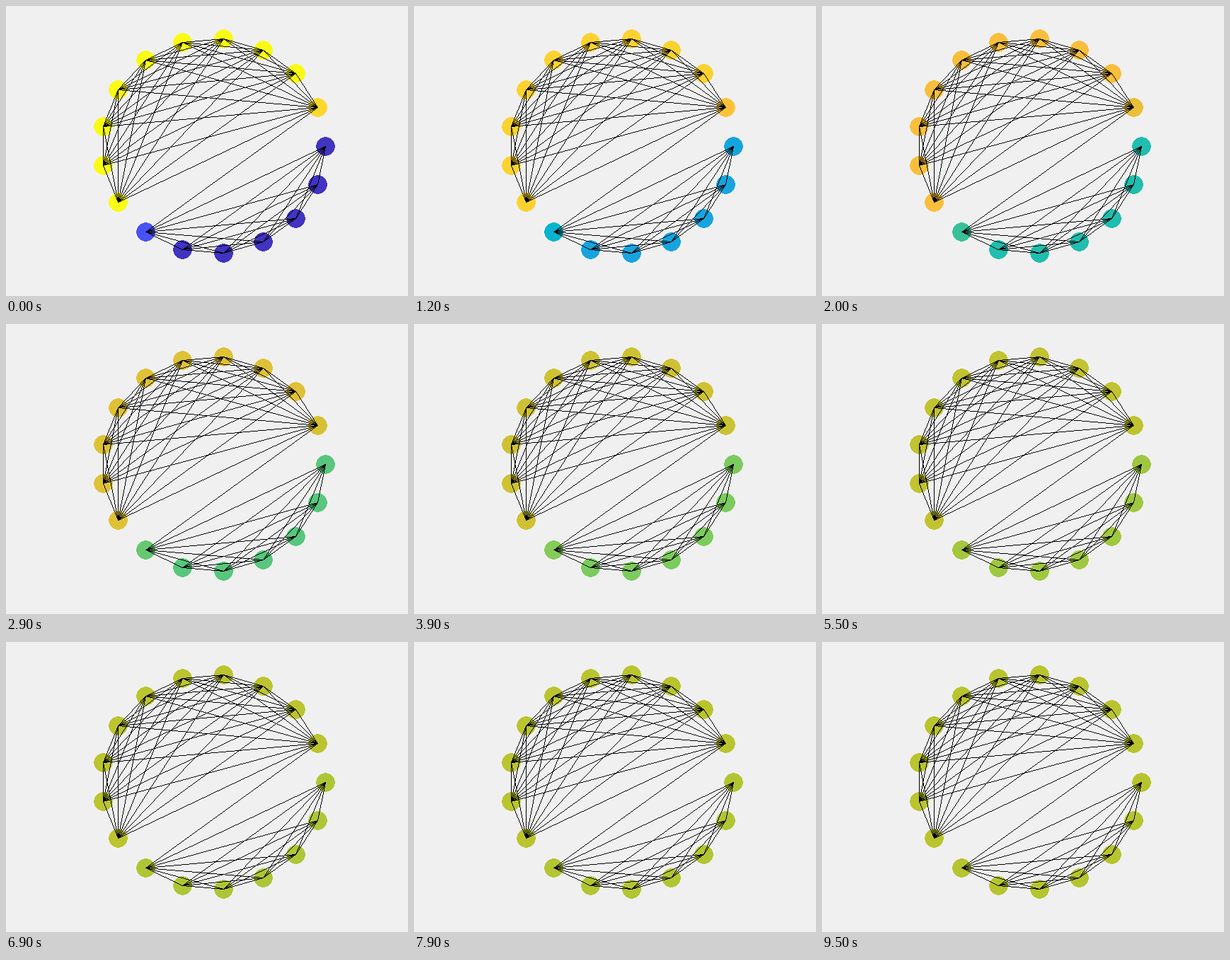
Recreate the animation shown at these times as a matplotlib script. Size 568 by 410 pixels, loop 10 s.

```python
from itertools import combinations

import numpy as np
import matplotlib.pyplot as plt
from matplotlib.animation import FuncAnimation
from matplotlib.collections import PatchCollection
from matplotlib.colors import LinearSegmentedColormap
from matplotlib.patches import Circle

W, H, DPI = 568, 410, 72
FRAMES, INTERVAL = 100, 100
STEPS = 2                         # averaging steps per frame

# Two complete groups of nodes joined by one edge
N, LOWER = 17, 7
LOW_BRIDGE, UP_BRIDGE = LOWER - 1, N - 1
edges = [*combinations(range(LOWER), 2), *combinations(range(LOWER, N), 2),
         (LOW_BRIDGE, UP_BRIDGE)]

# Each step replaces a node's level by the mean of its neighbours
mix = np.zeros((N, N))
for a, b in edges:
    mix[a, b] = mix[b, a] = 1
mix /= mix.sum(axis=1, keepdims=True)

start = np.where(np.arange(N) < LOWER, 4.0, 68.0)
start[LOW_BRIDGE], start[UP_BRIDGE] = 10, 58


def levels(i):
    return np.linalg.matrix_power(mix, STEPS * i) @ start


LOW, HIGH = 1, 64
stops = {1: "#3e26a8", 10: "#4852f4", 15: "#3e6fff", 22: "#2797eb",
         30: "#01b8ca", 43: "#81cc59", 47: "#b8c42e", 54: "#febe3d",
         64: "#f9fb15"}
cmap = LinearSegmentedColormap.from_list(
    "levels", [((v - LOW) / (HIGH - LOW), c) for v, c in stops.items()], N=1024)

angle = 2 * np.pi * np.arange(N) / N
nodes = np.column_stack([292.7 + 158 * np.cos(angle),
                         197.5 + 151.9 * np.sin(angle)]).round().astype(int)


def draw_line(image, p, q):
    """Set a one-pixel-wide line from p to q to opaque black."""
    count = np.abs(q - p).max() + 1
    x, y = np.linspace(p, q, count).round().astype(int).T
    image[y, x, 3] = 255


lines = np.zeros((H, W, 4), dtype=np.uint8)
for a, b in edges:
    draw_line(lines, nodes[a], nodes[b])

fig = plt.figure(figsize=(W / DPI, H / DPI), dpi=DPI, facecolor="#f0f0f0")
ax = fig.add_axes([0, 0, 1, 1])
ax.imshow(lines, extent=(0, W, H, 0), interpolation="nearest",
          aspect="auto", zorder=2)
ax.axis("off")

dots = PatchCollection([Circle(p + 0.5, 12.6) for p in nodes], cmap=cmap,
                       linewidths=0, antialiaseds=False, zorder=1)
dots.set_clim(LOW, HIGH)
ax.add_collection(dots)
ax.set(xlim=(0, W), ylim=(H, 0))


def update(i):
    dots.set_array(levels(i))
    return [dots]


anim = FuncAnimation(fig, update, frames=FRAMES, interval=INTERVAL,
                     init_func=lambda: update(0), repeat=True, repeat_delay=0)
plt.show()
```
